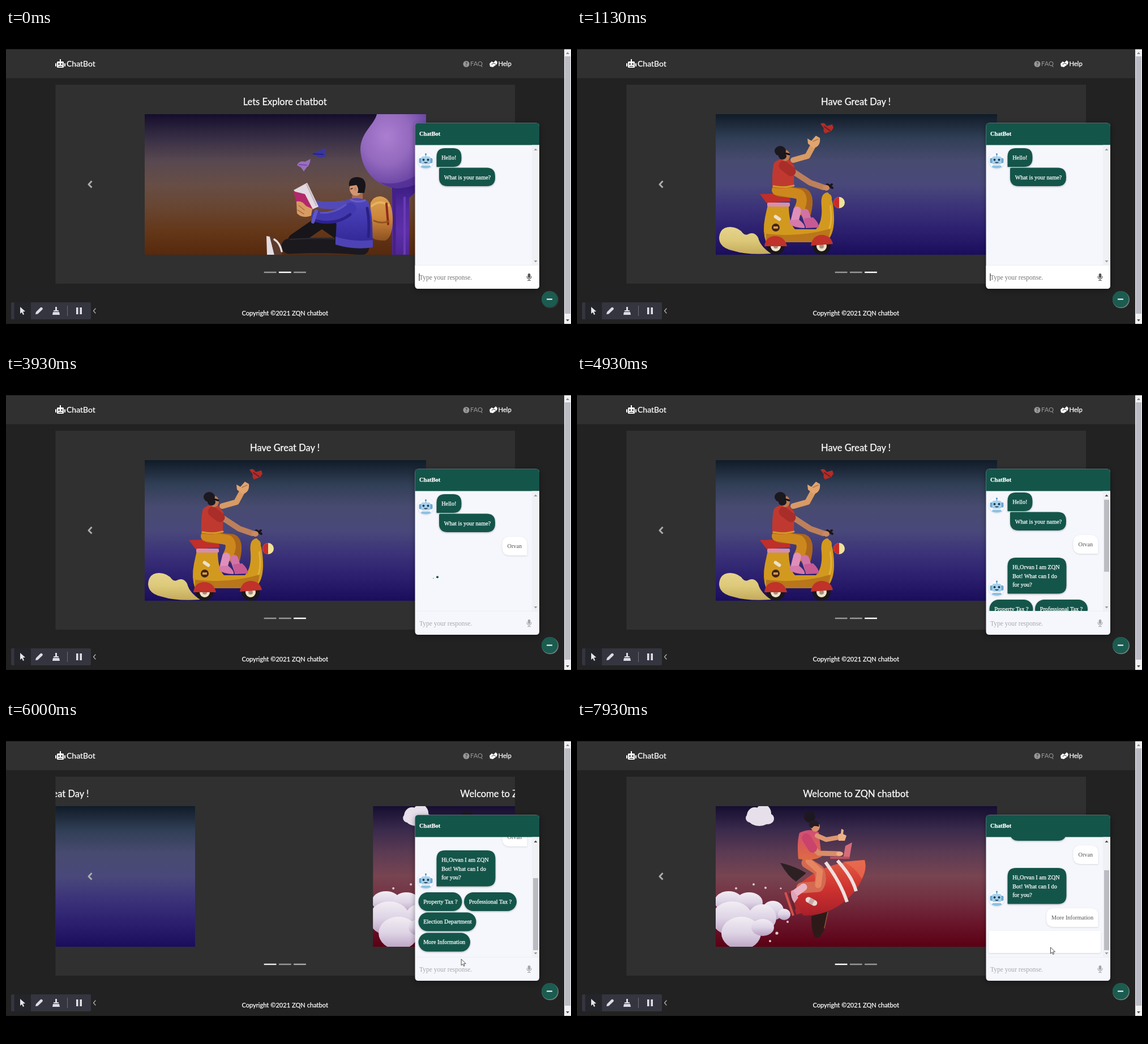
Animation, 998 px wide and 561 px high, one loop 8 s. Source, as an HTML page:

```html
<!DOCTYPE html>
<html lang="en">
<head>
<meta charset="utf-8">
<title>ChatBot</title>
<style>
html, body { margin: 0; width: 100%; height: 100%; overflow: hidden; background: #000; }
#stage { display: block; width: 100%; height: 100%; }
text { white-space: pre; }
.ui { font-family: Lato, sans-serif; }
.chat { font-family: "Liberation Serif", "Times New Roman", serif; }
.lift { filter: drop-shadow(0 1px 1.5px rgba(0,0,0,.3)); }
.soft { filter: drop-shadow(0 1px 1.5px rgba(0,0,0,.13)); }
.window { filter: drop-shadow(0 2px 5px rgba(0,0,0,.4)); }
</style>
</head>
<body>
<svg id="stage" viewBox="0 0 998 561"></svg>
<script>
const LOOP = 8000, STEP = 811, USER = 'Orvan', ORG = 'ZQN';
const SLIDE_A = 100, SLIDE_B = 5700, SLIDE_MS = 600;
const TYPE = 1900, KEY_MS = 150, SEND = 3000, REPLY = 4600, OPTIONS = 4900;
const CLICK = 7000, CARD = 7840;
const GREEN = '#14554a', PALE = '#f5f7fd', SKIN = '#d89c62';

// Drawing helpers
const R = (x, y, w, h, fill, r = 0, more = '') =>
  `<rect x="${x}" y="${y}" width="${w}" height="${h}" rx="${r}" fill="${fill}" ${more}/>`;
const P = (d, fill, more = '') => `<path d="${d}" fill="${fill}" ${more}/>`;
const E = (x, y, rx, ry, fill, more = '') =>
  `<ellipse cx="${x}" cy="${y}" rx="${rx}" ry="${ry}" fill="${fill}" ${more}/>`;
const L = (d, color, w, cap = 'round') =>
  `<path d="${d}" fill="none" stroke="${color}" stroke-width="${w}" stroke-linecap="${cap}" stroke-linejoin="round"/>`;
// White text gets a hairline stroke to look as heavy as screen-hinted text
const T = (x, y, size, fill, str, cls = 'chat', more = '') =>
  `<text x="${x}" y="${y}" font-size="${size}" fill="${fill}" class="${cls}" ${fill === '#fff' ? 'stroke="#fff" stroke-width=".25"' : ''} ${more}>${str}</text>`;
const G = (id, body, more = '') => `<g id="${id}" ${more}>${body}</g>`;
const clipBox = (x, y, w, h, body) =>
  `<svg x="${x}" y="${y}" width="${w}" height="${h}" viewBox="${x} ${y} ${w} ${h}">${body}</svg>`;
const grad = (id, ...colors) => `<linearGradient id="${id}" x1="0" y1="0" x2="0" y2="1">` +
  colors.map((c, i) => `<stop offset="${i / (colors.length - 1)}" stop-color="${c}"/>`).join('') + '</linearGradient>';

// Rounded box with one corner radius each: tl, tr, br, bl
function box(x, y, w, h, [a, b, c, d], fill, cls = 'lift') {
  return P(`M${x + a} ${y}h${w - a - b}q${b} 0 ${b} ${b}v${h - b - c}q0 ${c} ${-c} ${c}h${c + d - w}q${-d} 0 ${-d} ${-d}v${a + d - h}q0 ${-a} ${a} ${-a}z`,
    fill, `class="${cls}"`);
}
const bubble = (x, y, w, h, corners, lines) => box(x, y, w, h, corners, GREEN) +
  lines.map((s, i) => T(x + 8.7, y + 20 + i * 15.5, 10.3, '#fff', s)).join('');
const said = (x, y, w, str) => box(x, y, w, 33, [14, 14, 1, 14], '#fff', 'soft') + T(x + 9, y + 19.5, 10.3, '#555', str);
const option = (x, y, w, str, id = '') =>
  R(x, y, w, 33, GREEN, 16.5, `class="lift" ${id}`) + T(x + 8.7, y + 19.5, 10.3, '#fff', str);

const defs = `<defs>
${grad('dusk', '#150d2b', '#372e45', '#584850', '#674e46', '#684531', '#643719', '#57290d')}
${grad('night', '#101b27', '#303e55', '#484b70', '#49487a', '#3b3279', '#2b1f6e', '#1a0d5c')}
${grad('ember', '#150e30', '#3a2a4c', '#5c3b53', '#784451', '#722f40', '#69152a', '#5b0014')}
${grad('trunk', '#3a1c80', '#532a9f', '#5c2fa8', '#4e2594')}
${grad('coat', '#5148bd', '#4036ab', '#2f2490')}
${grad('pack', '#dba04f', '#cb8539', '#8d5122')}
${grad('shirt', '#d14e76', '#d95b58', '#dd6c43')}
${grad('hull', '#e35c43', '#cf3330', '#a81f29')}
${grad('puff', '#f2edf3', '#ddd3e5', '#b99fc0')}
${grad('dust', '#e6d58e', '#dcc878', '#c4aa5c')}
<radialGradient id="leaf" cx=".4" cy=".3" r=".75"><stop offset="0" stop-color="#ab7ed0"/><stop offset=".5" stop-color="#9369be"/><stop offset="1" stop-color="#5f3c9d"/></radialGradient>
</defs>`;

function reader() {
  return R(245, 152, 497, 248, 'url(#dusk)') +
    P('M682 276H723V290L712 300V400H682Z', 'url(#trunk)') + L('M686 284V400', '#452089', 5, 'butt') + L('M704 298V400', '#6a3bb5', 4, 'butt') +
    P('M655 152C650 172 626 184 626 215C628 252 655 281 692 283Q722 281 742 266V152Z', 'url(#leaf)') +
    P('M660 272Q700 282 742 248V266Q722 281 692 283Q674 282 660 272Z', '#4f2c93', 'opacity=".7"') +
    P('M541 222Q550 216 555 216L566 211 562 221 567 225Q555 232 549 226Z', '#3a36a0') + L('M543 222L560 223', '#272083', 2) +
    P('M514 242Q518 233 528 236L538 231Q536 244 531 246L526 253 521 246Z', '#9a70be') + L('M518 241L531 242', '#7b4ba8', 2) +
    L('M594 366L558 341L510 374', '#17151a', 23) + L('M500 385Q570 381 628 387', '#1b191e', 27) +
    L('M502 373Q550 370 580 372', '#2d2a32', 2) +
    P('M460 367L466 368 474 400H461Z', '#e2dce2') + P('M466 368L478 372 488 400H474Z', '#5c3a2e') +
    L('M474 373Q484 379 487 394', '#e6deda', 3.5) +
    P('M644 308Q650 296 662 297Q682 300 683 335Q684 368 670 375Q650 376 642 366Z', 'url(#pack)') +
    L('M646 314Q660 302 676 313', '#e6b25f', 4) + L('M672 310L675 346', '#8e2a1e', 4) + L('M650 340Q662 346 676 341', '#91531e', 3) +
    P('M613 286H630V306H610Z', '#a86c4c') + E(618, 283, 11, 13, '#d29672') +
    P('M606 279Q604 263 621 263Q636 264 635 280L633 291 621 291Q624 283 619 277Z', '#17141a') +
    E(617, 284, 2.2, 3.2, '#c4845f') + L('M609 284L612 283', '#352017', 1.5) +
    P('M602 303Q620 296 639 305Q646 320 647 345L648 386Q614 392 582 381L584 340Q588 311 602 303Z', 'url(#coat)') +
    P('M582 368Q612 378 648 374V387Q614 392 582 382Z', '#4d43b5') + L('M609 303Q620 309 634 304', '#695fca', 3) +
    L('M638 318Q643 345 640 368', '#2a2083', 5) +
    L('M596 311Q570 315 550 311', '#534aba', 13) +
    L('M609 318Q588 338 549 332', '#4339ae', 20) + L('M608 329Q582 349 547 340', '#2d228b', 5) +
    L('M600 312Q580 327 556 326', '#5e55c3', 3) + L('M548 323L542 342', '#5f55c4', 6) +
    P('M508 286L532 273 552 315 539 321Z', '#e2dae0') + P('M508 288L528 293 542 320 513 309Z', '#b3296b') +
    L('M531 276L548 313', '#bfb3c0', 2) + P('M513 306Q523 304 530 314L541 319 539 331Q524 337 514 327Z', SKIN) +
    L('M517 313L527 321M515 321L526 328', '#a86f42', 1.5);
}

function rider() {
  const wheel = x => E(x, 384, 16, 16, '#191719') + E(x, 385, 9, 9, '#eee1cc') + E(x, 385, 4, 4, '#a4917b');
  return R(245, 152, 497, 248, 'url(#night)') +
    P('M251 371Q252 351 271 351Q286 352 293 362Q298 367 304 363Q314 359 320 370Q324 386 343 398Q301 401 276 393Q252 388 251 371Z', 'url(#dust)') +
    wheel(351) + wheel(432) +
    P('M337 312H374Q374 344 385 355H422Q434 342 432 315Q429 291 443 290Q453 300 454 332Q455 360 444 373L418 378H334Q327 360 332 335Z', '#d2991f') +
    P('M334 363Q392 370 448 354L444 373 418 378H334Z', '#b9761b') + L('M446 306Q452 336 446 353', '#e3b13b', 3) +
    P('M331 385Q333 367 351 367Q367 368 371 385Z', '#c0322a') + P('M413 384Q416 365 433 365Q449 366 452 381Z', '#c0322a') +
    P('M323 293L375 291 377 306 335 309Z', '#c02f2a') + R(336, 308, 40, 7, '#d58eb0', 2) +
    E(351, 352, 7, 7, '#42241e') + R(347, 350, 8, 4, '#d79d35') +
    R(347, 332, 14, 6, '#eae0cc', 3, 'transform="rotate(34 354 335)"') +
    L('M357 288L400 292Q411 297 404 326', '#ad671b', 19) + L('M353 286L392 293Q402 302 391 322', '#cd881d', 18) +
    L('M403 326L409 344', '#d173a6', 14) + P('M401 336L417 334Q428 344 427 352L404 353Z', '#c55a95') +
    L('M389 322L384 342', '#e08fbb', 14) + P('M376 339L392 338Q404 347 402 353Q385 353 376 346Z', '#d57aaa') +
    P('M348 238Q359 228 375 232L384 244 383 280Q364 285 345 281Q344 253 348 238Z', '#c03930') +
    L('M347 279Q364 283 383 278', '#d39a2a', 3) +
    L('M382 233L407 226L419 204', '#d99a64', 10) + P('M408 204L407 195 414 199 422 190 429 194Q431 208 418 212Z', '#e2a56f') +
    L('M417 200L426 196', '#b77546', 1.5) +
    L('M377 250L412 273L435 281', '#bd805b', 10) + L('M365 243L378 253', '#a92d29', 17) +
    E(368, 225, 8, 10, '#bc7c54') + E(359, 217, 10, 9, '#1b181f') + E(363, 226, 7, 6, '#1b181f') + L('M368 221L375 223', '#111', 3) +
    L('M438 285L450 276M442 276L451 282', '#1c1517', 4) + E(440, 282, 6, 5, '#ca8a5e') +
    R(433, 292, 17, 23, '#d2991f', 8) + E(463, 308, 10, 10, '#efe29b') + P('M463 298A10 10 0 0 0 463 318Z', '#cb2b28') +
    P('M430 169Q437 165 441 173L451 170 453 176 449 182 438 186Q434 181 436 177Z', '#b02d28') + L('M437 174L447 181', '#72191c', 2);
}

function pilot() {
  const puffs = [[268, 320, 25, 18], [304, 322, 24, 18], [274, 350, 36, 30], [346, 336, 19, 17], [327, 349, 25, 24], [290, 376, 35, 29], [328, 366, 20, 15], [366, 343, 11, 10]];
  const dots = [[281, 297, 2], [312, 290, 2], [333, 296, 2], [360, 297, 1.6], [372, 356, 2], [353, 376, 2.6], [341, 390, 2]];
  return R(245, 152, 497, 248, 'url(#ember)') +
    [[314, 169, 14, 15], [329, 165, 14, 16], [337, 174, 11, 10], [307, 173, 9, 8], [322, 178, 17, 9]].map(a => E(...a, '#e7e0eb')).join('') +
    puffs.map(a => E(...a, 'url(#puff)')).join('') + dots.map(([x, y, r]) => E(x, y, r, r, '#e3c8d2')).join('') +
    P('M359 252Q383 257 405 270L387 285Q372 276 359 252Z', '#2d2023') +
    P('M414 346L443 338 438 366Q430 386 423 384Q414 381 414 346Z', '#2d1a18') + L('M443 339L437 367', '#8f5639', 1.5) +
    P('M392 291Q432 251 508 247Q515 270 489 304Q454 345 401 345Q378 328 392 291Z', 'url(#hull)') +
    P('M468 250L508 247Q513 263 503 280Q488 255 468 250Z', '#eb7255', 'opacity=".65"') +
    L('M439 251Q466 287 477 321', '#eee1df', 6, 'butt') + L('M460 248Q486 276 493 302', '#eee1df', 6, 'butt') +
    L('M378 301L392 342', '#ad292f', 9, 'butt') + L('M368 304L382 345', '#d74f4b', 4, 'butt') + L('M376 307L385 333', '#642329', 3) +
    `<g transform="rotate(28 414 320)">${R(403, 315, 22, 10, '#eadad4', 5)}${R(410, 315, 8, 10, '#c8aaa5')}</g>` +
    L('M406 252L427 265Q434 282 426 294L397 296', '#d36a51', 19) + L('M409 249L429 267L426 291', '#e78560', 11) +
    L('M400 295L385 306', '#eab3c4', 13) + P('M381 300L391 313 384 323Q377 314 378 302Z', '#dba4b9') +
    P('M393 199Q411 190 427 198L432 241Q415 250 391 245Q388 215 393 199Z', 'url(#shirt)') +
    L('M424 204L440 211L463 207', '#dd9771', 8) + P('M461 202L466 200 467 192 471 194 470 201 476 204 473 213 462 213Z', '#edb087') +
    L('M409 218L427 235L463 236', '#d98d67', 9) + L('M405 208L416 226', '#c9436c', 16) +
    P('M474 222L486 216 481 245 470 245Z', '#d66c79') + R(447, 241, 34, 4, '#bd505f', 1) + E(464, 236, 6, 4, '#edb087') +
    E(421, 188, 8, 9, '#d98f6b') + E(411, 171, 10, 10, '#1d1820') + P('M410 180Q420 172 428 182L427 188Q420 184 415 191Q408 188 410 180Z', '#241d26') +
    L('M419 186L427 187', '#1b1318', 1.5);
}

const slide = (id, title, art) => G(id, T(492.7, 136, 16.5, '#fff', title, 'ui', 'text-anchor="middle"') + clipBox(245, 152, 497, 248, art));

const robot = `<g>${E(0, 0, 14, 14, '#f7f8fc', 'class="soft"')}
${L('M0 -11V-6', '#80a6c4', 1.5)}${E(0, -11, 1.5, 1.5, '#4b8cbd')}${R(-12, -4, 24, 9, '#6ea6d0', 2)}
${R(-8, -7, 16, 14, '#a6d2ed', 3)}${E(-4, -1, 2, 2, '#173b55')}${E(4, -1, 2, 2, '#173b55')}
${P('M-4 3H4Q0 7 -4 3Z', '#23384e')}${P('M-7 9H7L9 12Q0 16 -9 12Z', '#8cc1e3')}</g>`;
const avatar = (x, y) => `<g transform="translate(${x} ${y})">${robot}</g>`;

function page() {
  return R(0, 37.5, 998, 484.5, '#222') + R(0, 37.5, 986, 51, '#303030') +
    R(90, 59, 12, 11, '#fff', 1.5) + R(95, 55, 2, 5, '#fff') + R(87, 62, 2, 6, '#fff', 1) + R(103, 62, 2, 6, '#fff', 1) +
    E(93.5, 63.5, 1.5, 1.5, '#303030') + E(98.5, 63.5, 1.5, 1.5, '#303030') + R(92.5, 67, 7, 1.2, '#303030') +
    T(107, 68, 14, '#fff', 'ChatBot', 'ui') +
    E(813, 63.5, 5.5, 5.5, '#989898') + T(813, 67, 9, '#303030', '?', 'ui', 'text-anchor="middle" font-weight="700"') +
    T(820, 67.3, 11.25, '#989898', 'FAQ', 'ui') +
    P('M854 63L858 59 861 61 865 57 868 60 867 64 860 69 855 68Z', '#fff') + L('M858 64L862 62L865 64', '#303030', 1) +
    T(869.5, 67.3, 11.25, '#fff', 'Help', 'ui') +
    R(87.5, 100, 811.5, 351, '#303030') +
    clipBox(87.5, 100, 811.5, 351, slide('s0', 'Lets Explore chatbot', reader()) + slide('s1', 'Have Great Day !', rider()) + slide('s2', `Welcome to ${ORG} chatbot`, pilot())) +
    L('M151.5 270L146 276L151.5 281.5', '#acacac', 3, 'butt') +
    [0, 1, 2].map(i => R(455.7 + i * 26.2, 429.8, 21.8, 2.4, '#fff', 0, `id="dot${i}"`)).join('') +
    T(492.7, 506.7, 11.1, '#fff', `Copyright ©2021 ${ORG} chatbot`, 'ui', 'text-anchor="middle"') +
    R(986, 37.5, 12, 484.5, '#f1f1f3') + R(987, 50, 10, 454, '#bcbcc5') +
    P('M989 46L992 42.5 995 46Z', '#8a8a8e') + P('M989 514L992 517.5 995 514Z', '#505050');
}

function toolbar() {
  return R(9, 484, 141, 30, '#34353f', 2) + R(14.5, 484, 29.5, 30, '#24252b') +
    P('M25 492L25 504 28 501.5 30 506 32 505 30 500.5 34 500Z', '#e4e4ea') +
    P('M52 505L53 501 61 493Q63 492 64.5 494Q65.5 496 64 497L56 504.5Z', '#dcdce4') +
    R(87, 492, 3, 6, '#dcdce4') + P('M84 498H93V500H84ZM83 501H94L95 506H82Z', '#dcdce4') +
    R(108, 490, 1, 18, '#6d6e78') + R(124, 493, 3.5, 12, '#e0e0e8') + R(130.5, 493, 3.5, 12, '#e0e0e8') +
    L('M158 495L154.5 499L158 503', '#b5b5bb', 1.2);
}

function chat() {
  const content =
    avatar(741.5, 233.5) + bubble(760.5, 212, 44, 33, [15, 15, 15, 1], ['Hello!']) +
    bubble(765, 246.5, 99, 32.5, [2, 15, 15, 15], ['What is your name?']) +
    G('name', said(876.5, 287, 44, USER)) +
    G('reply', avatar(741.5, 380) + bubble(760.5, 327, 104, 63.5, [15, 15, 15, 1], [`Hi,${USER} I am ${ORG}`, 'Bot! What can I do', 'for you?'])) +
    G('options', option(728.5, 401, 77, 'Property Tax ?') + option(809, 401, 93, 'Professional Tax ?') +
      option(728.5, 436.5, 102, 'Election Department') + option(728.5, 472.5, 91.5, 'More Information', 'id="more"')) +
    G('choice', said(829, 398, 91.5, 'More Information')) +
    G('card', R(727, 438, 198, 39, '#fff', 3, 'class="soft"')) +
    G('typing', [0, 1, 2].map(i => E(755 + i * 7, 361, 1, 1, '#175044', `id="beat${i}"`)).join(''));
  return `<g class="window">${box(722.5, 167.5, 219.5, 292.5, [6, 6, 6, 6], PALE, '')}</g>` +
    clipBox(723, 206, 206, 212, G('log', content)) +
    box(722.5, 167.5, 219.5, 39, [6, 6, 0, 0], GREEN, '') + T(730, 189.5, 10.3, '#fff', 'ChatBot', 'chat', 'font-weight="700"') +
    R(929, 206.5, 13, 211.5, '#f0f1f5') + R(931, 220, 9, 186, '#bbbcc2', 0, 'id="thumb"') +
    P('M932.5 216L935.5 212.5 938.5 216Z', '#999', 'id="up"') + P('M932.5 410L935.5 413.5 938.5 410Z', '#999') +
    R(723, 418, 219, 1, '#eceef4') + G('field', box(722.5, 419, 219.5, 41, [0, 0, 6, 6], '#fff', '')) +
    T(730, 443.5, 11.55, '#757575', 'Type your response.', 'chat', 'id="entry"') + R(729.5, 433, 1, 13, '#111', 0, 'id="caret"') +
    G('mic', R(921.7, 433, 4.6, 8, '#555', 2.3) + L('M920 438Q920 442.5 924 442.5Q928 442.5 928 438M924 442.5V445.5M921.5 445.5H926.5', '#555', 1.1)) +
    E(961, 479.3, 15, 15, '#6d7f7b', 'id="ring"') + E(960.2, 478.3, 14.3, 14.3, '#1b5b50') + R(955, 477.5, 10, 2, '#fff');
}

const pointers = G('arrow', P('M0 0V11L2.6 8.7 4.3 12.5 6 11.7 4.4 8 8 8Z', '#fff', 'stroke="#222" stroke-width=".8"')) +
  G('hand', P('M-1.2 .5Q0 -1 1.3 .5V5Q3 4 3.5 5.5Q5.3 4.5 5.8 6.2Q7.7 5.5 8 7.5V11Q7 13 6.5 14.5H0L-3 9.5Q-3 7.5 -1.2 8.5Z', '#fff', 'stroke="#222" stroke-width=".8"'));

const stage = document.getElementById('stage');
stage.innerHTML = defs + page() + toolbar() + chat() + pointers;
const el = {};
stage.querySelectorAll('[id]').forEach(n => el[n.id] = n);

const set = (id, attrs) => { for (const k in attrs) el[id].setAttribute(k, attrs[k]); };
const show = (id, on) => el[id].setAttribute('display', on ? 'inline' : 'none');
const move = (id, x, y) => el[id].setAttribute('transform', `translate(${x} ${y})`);
const ramp = (t, start, ms) => Math.min(1, Math.max(0, (t - start) / ms));
const mix = (a, b, k) => a + (b - a) * k;

function bezier(x1, y1, x2, y2) {
  const at = (a, b, s) => 3 * (1 - s) * (1 - s) * s * a + 3 * (1 - s) * s * s * b + s * s * s;
  return x => {
    if (x <= 0 || x >= 1) return x;
    let lo = 0, hi = 1;
    for (let i = 0; i < 18; i++) {
      const mid = (lo + hi) / 2;
      if (at(x1, x2, mid) < x) lo = mid; else hi = mid;
    }
    return at(y1, y2, lo);
  };
}
const ease = bezier(.25, .1, .25, 1), inOut = bezier(.42, 0, .58, 1);

function drawCarousel(t) {
  const a = ramp(t, SLIDE_A, SLIDE_MS), b = ramp(t, SLIDE_B, SLIDE_MS);
  const pos = inOut(a) + inOut(b);
  for (let i = 0; i < 3; i++) {
    show('s' + i, Math.abs(i - pos) < 1);
    move('s' + i, (i - pos) * STEP, 0);
  }
  const lit = [ease(b), 1 - ease(a), ease(a) - ease(b)];
  lit.forEach((v, i) => set('dot' + i, { opacity: .5 + v / 2 }));
}

function drawChat(t) {
  const asked = t >= OPTIONS && t < CLICK, picked = t >= CLICK;
  const waiting = (t >= SEND + 150 && t < REPLY) || (t >= CLICK + 150 && t < CARD);
  const scroll = picked ? 66 : 97 * inOut(ramp(t, OPTIONS, 250));
  move('log', 0, -scroll);
  show('name', t >= SEND);
  show('reply', t >= REPLY);
  show('options', asked);
  show('choice', picked);
  show('card', t >= CARD);
  show('typing', waiting);
  move('typing', 0, picked ? 98 : 0);
  for (let i = 0; i < 3; i++) {
    const p = ((t - 3930) / 1000 + .45 - i * .25 + 4) % 1;
    const k = p < .5 ? Math.sin(p * 2 * Math.PI) : 0;
    set('beat' + i, { rx: 2.1 * k, ry: 2.1 * k, cy: 361.5 - 3.5 * k });
  }

  const over = asked || picked;
  show('thumb', over);
  const size = picked ? 141 : 127;
  set('thumb', { height: size, y: picked ? 265 : mix(220, 279, scroll / 97) });
  set('up', { fill: over ? '#444' : '#999' });

  const open = t < SEND;
  const typed = open ? USER.slice(0, Math.max(0, Math.floor((t - TYPE) / KEY_MS) + 1)) : '';
  el.entry.textContent = typed || 'Type your response.';
  set('entry', { fill: typed ? '#333' : open ? '#757575' : '#a7a8ac' });
  show('field', open);
  show('caret', open && (typed || t % 1060 < 530));
  set('caret', { x: typed ? 730 + el.entry.getComputedTextLength() : 729.5 });
  set('mic', { opacity: open ? 1 : .5 });
  set('ring', { opacity: mix(.25, 1, ramp(t, 0, 300)) });
}

function drawPointer(t) {
  const a = inOut(ramp(t, 5760, 500)), b = inOut(ramp(t, CLICK + 150, 500));
  const x = mix(mix(826, 779.5, a), 836.5, b), y = mix(mix(438, 403.5, a), 401, b);
  const hover = t < CLICK && x < 820 && y < 408;
  show('arrow', t >= 5760 && !hover);
  show('hand', t >= 5760 && hover);
  move('arrow', x, y);
  move('hand', x, y);
  set('more', { fill: t >= 5760 && hover ? '#54837a' : GREEN });
}

function frame() {
  const t = performance.now() % LOOP;
  drawCarousel(t);
  drawChat(t);
  drawPointer(t);
  requestAnimationFrame(frame);
}
frame();
</script>
</body>
</html>
```
